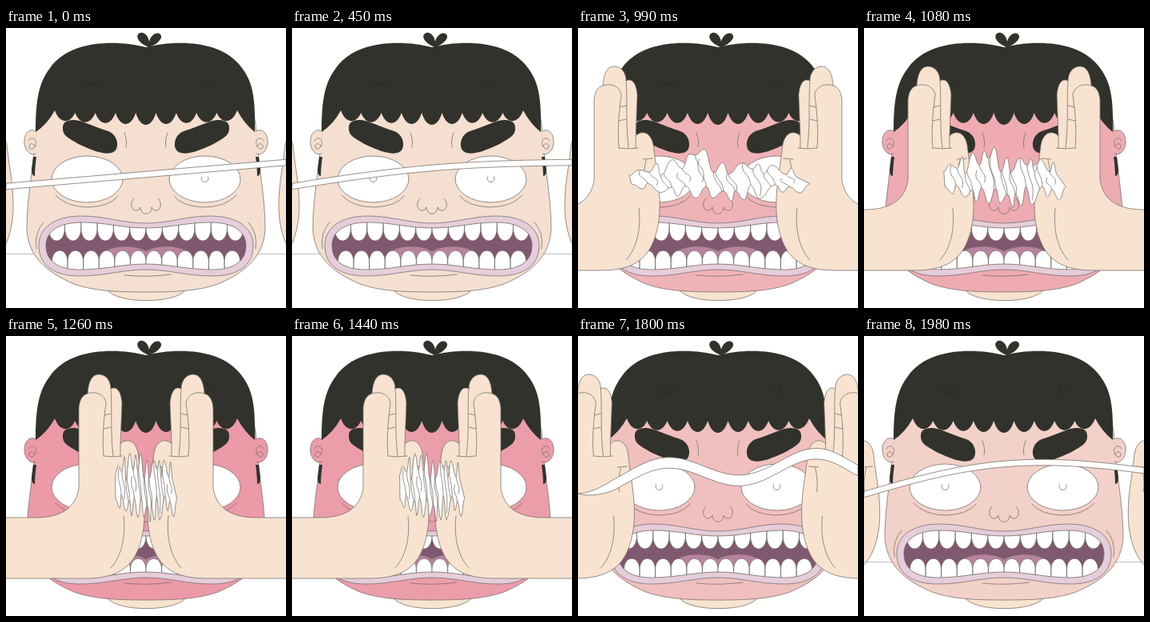
An HTML page with a canvas that plays this animation: 350 px wide and 350 px high, repeating every 2.07 s.

```html
<!DOCTYPE html>
<html lang="en">
<head>
<meta charset="utf-8">
<title>Squeeze</title>
<style>
html, body { margin: 0; width: 100%; height: 100%; overflow: hidden; background: #fff; }
canvas { display: block; width: 350px; height: 350px; }
</style>
</head>
<body>
<canvas id="stage"></canvas>
<script>
const canvas = document.getElementById('stage');
const ctx = canvas.getContext('2d');
const dpr = window.devicePixelRatio || 1;
canvas.width = canvas.height = 350 * dpr;

const STEP = 90, COUNT = 23;
const INK = '#736c68', BLACK = '#31322c', SKIN = '#f7e3cf';
const PALE = [244, 223, 208], RED = [236, 153, 168];

const lerp = (a, b, t) => a + (b - a) * t;
const clamp = v => Math.max(0, Math.min(1, v));
const ease = v => { const t = clamp(v); return t * t * (3 - 2 * t); };
const noise = i => { const v = Math.sin(i * 12.9898 + 4) * 43758.5453; return v - Math.floor(v); };
const shape = d => new Path2D(d);

function paint(path, fill, line = INK) {
  if (fill) { ctx.fillStyle = fill; ctx.fill(path); }
  if (line) { ctx.strokeStyle = line; ctx.lineWidth = 0.75; ctx.stroke(path); }
}

// Draws the same thing on both sides of the centre line
function both(draw) {
  draw();
  ctx.save();
  ctx.translate(350, 0);
  ctx.scale(-1, 1);
  draw();
  ctx.restore();
}

// One half of a shape, closed along the centre line and joined to its mirror
function sym(d) {
  const p = shape(d);
  p.addPath(shape(d), new DOMMatrix([-1, 0, 0, 1, 350, 0]));
  return p;
}

const head = shape('M175 60C120 60 45 60 38 120C36 165 26 210 26 250C27 285 50 305 85 320C110 329 140 330 175 330');
const lips = shape('M175 244C145 244 125 235 95 235C60 235 41 250 41 272C41 298 62 310 92 310C125 310 145 302 175 302');
const inner = 'M175 250C145 250 125 243 95 243C66 243 50 254 50 272C50 292 66 302 92 302C125 302 145 295 175 295';
const mouth = shape(inner), mouthArea = sym(inner);
const tongue = shape('M175 279C160 269 118 270 113 292C113 300 150 305 175 305');

const ear = shape('M38 129C28 124 22 134 23 144C24 155 32 160 37 157');
const curl = shape('M28 141C32 134 39 139 37 146C35 152 29 153 29 148C29 144 34 143 36 148');
const burn = shape('M34 161L38 161Q36 175 36 185Q32 185 32 177Z');
const brow = shape('M71 126C70 115 82 113 95 117C107 121 118 126 128 129C138 133 141 144 138 151C134 159 122 157 112 154C98 149 88 144 79 138C74 135 71 131 71 126Z');
const creases = shape('M148 131Q152 141 150 149M62 209Q76 224 103 224Q130 223 140 210M47 243Q35 256 38 276');
const nose = shape('M160 213C153 220 158 229 163 228Q167 228 168 224C168 235 182 235 182 224Q183 228 187 228C192 229 197 220 190 213');
const chin = shape('M148 309Q177 312 206 308');
const neck = shape('M127 328C140 345 211 345 224 328Z');
const tuft = shape('M179 24C167 20 161 11 166 7C171 3 178 9 179 17C181 9 188 4 193 8C197 12 190 20 179 24Z');
const marks = shape('M98 65Q102 76 108 69Q114 76 119 65M244 65Q249 79 254 65');
const hand = shape('M-40 227L40 227C75 226 88 210 91 190L91 90C92 80 95 74 102 72C103 56 108 48 116 48C125 48 131 56 131 66C139 62 144 70 145 84L143 135C148 129 161 127 165 146L168 170C171 190 175 215 172 240C166 280 150 303 100 303L-40 303Z');
const handLines = shape('M102 72C113 68 124 74 125 84C122 105 120 130 122 150M131 66C133 90 130 115 134 150M143 135L143 150M123 99L131 97M122 116L131 114M122 150Q134 152 146 150M152 164L164 163M156 165Q152 180 154 195M147 225C150 252 144 276 131 290');

const hair = (() => {
  const p = new Path2D(), w = 25.3;
  p.moveTo(37, 130);
  p.bezierCurveTo(37, 90, 41, 68, 55, 50);
  p.bezierCurveTo(80, 14, 140, 15, 175, 24);
  p.bezierCurveTo(210, 15, 270, 14, 295, 50);
  p.bezierCurveTo(309, 68, 312, 90, 311, 130);
  p.quadraticCurveTo(298, 120, 289, 103);
  for (let i = 8; i >= 0; i--) {
    const x = 61 + i * w, low = 126 - Math.abs(i - 4) * 1.5;
    p.bezierCurveTo(x + w - 6, low, x + 6, low, x, i ? 106 : 103);
  }
  p.quadraticCurveTo(52, 120, 37, 130);
  p.closePath();
  return p;
})();

// Half a row of teeth from the centre outwards
function toothRow(p, w, root, neckY, tip) {
  for (let i = 0; i < 6; i++) {
    const b = 175 - i * w, a = b - w;
    p.moveTo(a, root);
    p.lineTo(a, neckY);
    p.bezierCurveTo(a + 1, tip, b - 1, tip, b, neckY);
    p.lineTo(b, root);
    p.closePath();
  }
}
const teeth = new Path2D();
toothRow(teeth, 20.3, 238, 251, 271);
toothRow(teeth, 19.6, 308, 291, 274);

function drawFace(heat) {
  const tone = 'rgb(' + PALE.map((v, i) => Math.round(lerp(v, RED[i], heat))) + ')';
  paint(shape('M0 282.5L350 282.5'), null, '#aaa');
  paint(neck, SKIN);
  // The hidden seam at the centre is covered by a hair's breadth of overlap
  both(() => paint(head, tone));
  ctx.fillStyle = tone;
  ctx.fillRect(174, 100, 2, 229);
  both(() => { paint(burn, BLACK, null); paint(ear, tone); paint(curl); });
  paint(tuft, BLACK, null);
  paint(hair, BLACK, null);
  paint(marks, null, '#23241f');
  both(() => {
    const eye = new Path2D(), pupil = new Path2D();
    eye.ellipse(101.5, 189, 44.5, 29, 0, 0, 7);
    pupil.arc(101.5, 188, 4.5, -0.5, Math.PI + 0.5);
    paint(eye, '#fff');
    paint(pupil);
    paint(brow, BLACK, null);
    paint(creases);
  });
  paint(nose);
  paint(chin);
  both(() => paint(lips, '#e6cddb'));
  ctx.save();
  ctx.clip(mouthArea);
  ctx.fillStyle = '#80586f';
  ctx.fillRect(40, 230, 270, 90);
  both(() => paint(tongue, '#b9829d'));
  both(() => paint(teeth, '#fff'));
  ctx.restore();
  both(() => paint(mouth));
}

// Strip under light pressure: a sagging line plus a travelling buckle
function drawRibbon(k) {
  const closing = k < 15;
  const wave = closing ? clamp((k - 5) / 4) ** 2 : clamp((22 - k) / 2);
  const bulge = closing ? 8 * clamp(k / 5) * (1 - wave / 2) : 23 * (1 - wave);
  const thick = 7.5 + wave * 6;
  const mid = u => lerp(198, 168, u) - bulge * Math.sin(Math.PI * u)
    - wave * 15 * (1 + Math.cos(2 * Math.PI * (u - 0.31) / 0.56)) * (1 - u ** 12);
  const half = u => thick / 2 * lerp(1, clamp(u * 8), wave);
  const p = new Path2D(), n = 70;
  for (let i = 0; i <= n; i++) p.lineTo(350 * i / n, mid(i / n) - half(i / n));
  for (let i = n; i >= 0; i--) p.lineTo(350 * i / n, mid(i / n) + half(i / n));
  p.closePath();
  paint(p, '#fff');
}

// Crumpled strip: two jagged edges with fold lines between them
function drawFolds(off, c) {
  const n = 10, left = 137 + off, span = 74 - 2 * off, w = span / n;
  const spike = u => 42 * (1 - c) * Math.exp(-(((u - 0.41) / 0.06) ** 2));
  const tall = u => lerp(lerp(2, 56, c * c), lerp(12, 82, c), Math.sin(Math.PI * u) ** 0.7);
  const edgePoint = (j, side) => {
    const u = j / 2 / n, seed = j * 2 + (side > 0 ? 50 : 3);
    const jag = j % 2 ? lerp(0.75, 1.15, noise(seed + 7)) : lerp(0.25, 0.6, noise(seed + 7));
    return [left + u * span + (noise(seed) - 0.5) * w * 0.45 + side * w * 0.15,
      190 + side * tall(u) * 0.5 * jag - (side < 0 ? spike(u) : 0)];
  };
  const edge = side => Array.from({ length: 2 * n + 1 }, (_, j) => edgePoint(j, side));
  const tops = edge(-1), lows = edge(1);
  const outline = new Path2D(), folds = new Path2D();
  const follow = pts => pts.forEach((b, i) => {
    if (!i) return outline.lineTo(...b);
    const a = pts[i - 1], dx = (b[0] - a[0]) * 0.55;
    outline.bezierCurveTo(a[0] + dx, lerp(a[1], b[1], 0.15), b[0] - dx, lerp(a[1], b[1], 0.85), ...b);
  });
  follow(tops);
  follow(lows.slice().reverse());
  outline.closePath();
  paint(outline, '#fff');

  const fold = ([x, y], h, lean) => {
    folds.moveTo(x, y);
    folds.bezierCurveTo(x + lean * 0.1, y + h * 0.5, x + lean, y + h * 0.4, x + lean * 0.6, y + h);
  };
  for (let j = 2; j < 2 * n; j += 2) {
    const h = tall(j / 2 / n) * lerp(0.3, 0.7, noise(j));
    fold(tops[j], h, w * 0.7);
    fold(lows[j], -h, -w * 0.7);
  }
  ctx.save();
  ctx.clip(outline);
  paint(folds);
  ctx.restore();
}

function draw(k) {
  const close = Math.min(ease((k - 7.4) / 6.6), ease((23.2 - k) / 7.7));
  const off = -164 * (1 - close);
  ctx.setTransform(dpr, 0, 0, dpr, 0, 0);
  ctx.lineJoin = ctx.lineCap = 'round';
  ctx.fillStyle = '#fff';
  ctx.fillRect(0, 0, 350, 350);
  drawFace(clamp(Math.min((k - 6) / 8, (23.6 - k) / 8)));
  both(() => {
    ctx.save();
    ctx.translate(off, 0);
    paint(hand, SKIN);
    paint(handLines);
    ctx.restore();
  });
  if (k > 9 && k < 20) drawFolds(off, close);
  else drawRibbon(k);
}

const start = performance.now();
function tick() {
  draw(Math.floor((performance.now() - start) / STEP) % COUNT);
  requestAnimationFrame(tick);
}
tick();
</script>
</body>
</html>
```
